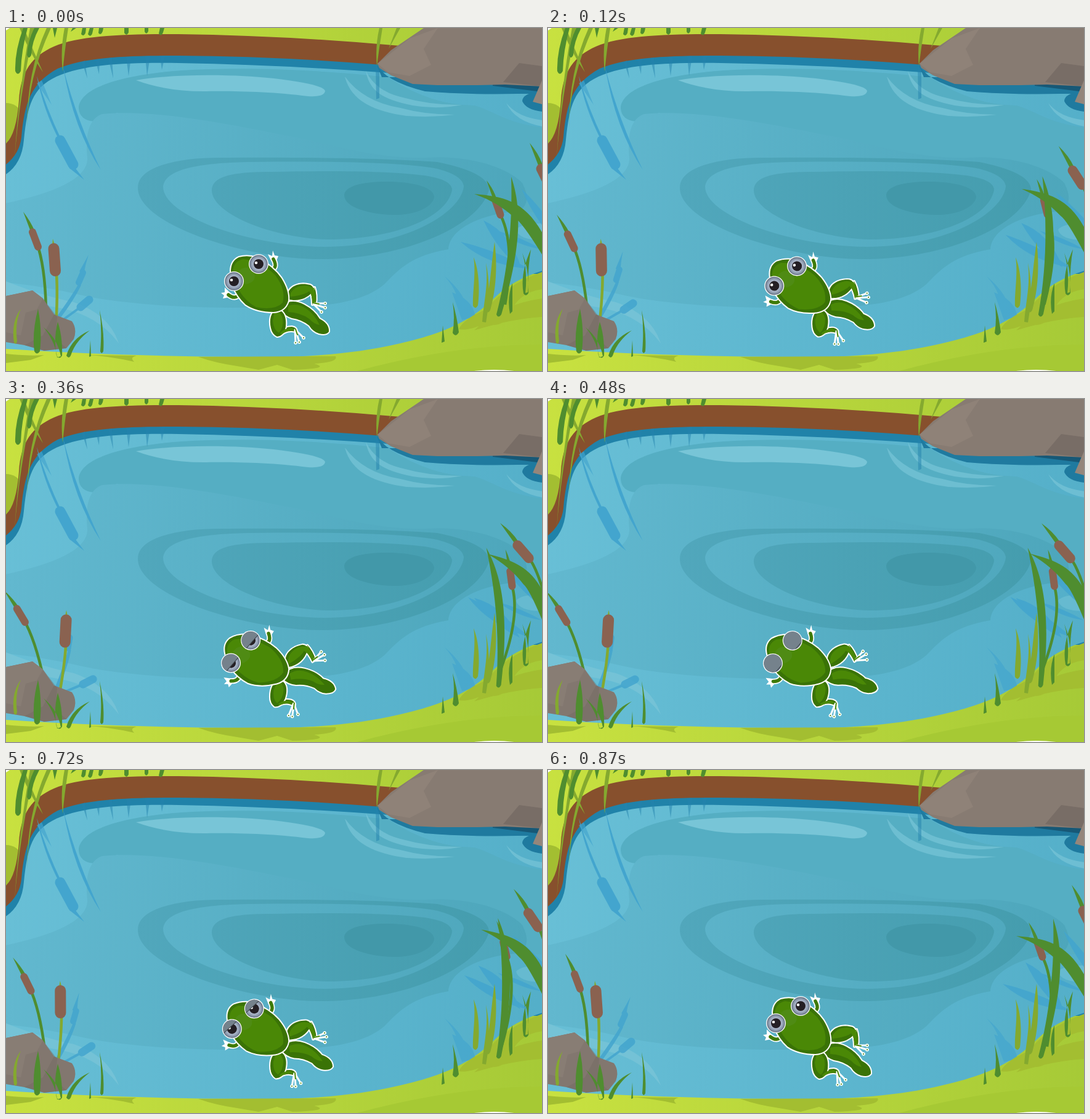
Write an HTML page that moves like this. It is 870x558 px and loops after 0.9 s.

```html
<!DOCTYPE html>
<html lang="en">
<head>
<meta charset="utf-8">
<title>Frog in a pond</title>
<style>
  html, body { margin: 0; width: 100%; height: 100%; overflow: hidden; }
  svg { display: block; width: 870px; height: 558px; }
  .leaf { fill: #4f8d2f; }
  .lime { fill: #84a92f; }
  .stem { fill: none; stroke: #4f8d2f; stroke-width: 4.5; }
  .pale { stroke: #84a92f; }
  .head { stroke: #8a6250; stroke-linecap: round; }
  .mirror { fill: #43a5ce; }
  .mirror-line { fill: none; stroke: #43a5ce; stroke-linecap: round; }
  .shade { fill: #a3be31; }
  .glint { fill: #78c5d7; }
  .skin { fill: #3a7306; stroke: #fff; stroke-width: 4; stroke-linejoin: round; paint-order: stroke; }
  .light { fill: #4a8806; }
  .arm { fill: none; stroke-linecap: round; }
  .toes { fill: none; stroke: #fff; stroke-width: 3; stroke-linecap: round; }
  .tips { fill: none; stroke: #fff; stroke-width: 5.5; stroke-linecap: round; }
  .dots { fill: none; stroke: #4b8907; stroke-width: 2; stroke-linecap: round; }
</style>
</head>
<body>
<svg viewBox="0 0 870 558">
  <defs>
    <linearGradient id="grass"><stop stop-color="#c8e140"/><stop offset="1" stop-color="#a6ca37"/></linearGradient>
    <linearGradient id="water" gradientUnits="userSpaceOnUse" x1="0" y1="200" x2="870" y2="330">
      <stop stop-color="#68bfd6"/><stop offset="1" stop-color="#54afc9"/>
    </linearGradient>
    <linearGradient id="mid" gradientUnits="userSpaceOnUse" x1="0" y1="250" x2="850" y2="350">
      <stop stop-color="#62b8cf"/><stop offset="1" stop-color="#4da6bb"/>
    </linearGradient>
    <linearGradient id="deep" gradientUnits="userSpaceOnUse" x1="214" y1="0" x2="785" y2="0">
      <stop stop-color="#51a7bc"/><stop offset="1" stop-color="#459dae"/>
    </linearGradient>
    <radialGradient id="ball"><stop offset=".5" stop-color="#b4bfd2"/><stop offset=".8" stop-color="#8f9cb0"/><stop offset="1" stop-color="#616d7e"/></radialGradient>
    <clipPath id="socket"><circle r="14.5"/></clipPath>
    <g id="eye">
      <circle r="16" fill="#fff"/>
      <circle r="14.7" fill="url(#ball)"/>
      <circle r="8" fill="#241f24"/>
      <circle cx="-4" cy="-2" r="2.3" fill="#fff"/>
      <g clip-path="url(#socket)">
        <rect id="lid" x="-20" y="-36" width="40" height="20" fill="#75828c" stroke="#3d454b" transform="rotate(-35)"/>
      </g>
    </g>
  </defs>

  <!-- banks and water -->
  <rect width="870" height="558" fill="url(#grass)"/>
  <path class="shade" d="M0 122Q18 122 27 140V200L0 188Z"/>
  <path fill="#87502d" d="M0 188Q17 172 21 118C24 70 42 46 78 30C120 12 190 10 280 10Q450 12 640 29V75H300L60 110L30 190L0 230Z"/>
  <path fill="#2082a9" d="M0 222Q22 204 25 178C30 122 40 90 84 66C130 47 200 45 280 45Q440 46 610 60L870 95V400H0Z"/>
  <path fill="url(#water)" d="M0 238Q26 220 29 182C35 126 42 98 82 79C130 58 200 56 280 57Q450 60 620 73L700 104L870 106V395Q822 410 794 438C750 481 704 498 640 513C560 532 470 537 380 535Q180 534 0 522Z"/>
  <path fill="#55aec3" d="M118 130C120 96 190 76 285 69C380 63 500 67 620 80Q690 126 760 126C790 134 810 154 870 162V300H760L180 138Q164 148 143 152Q119 150 118 130Z"/>
  <path fill="url(#mid)" d="M0 285C60 272 133 250 132 212C130 190 128 150 156 140C235 132 350 154 440 172C530 188 590 212 680 211C755 206 815 228 838 252Q855 285 832 298C775 302 720 325 718 360C660 370 640 390 615 416C570 456 480 455 390 455C270 456 170 446 120 434Q60 420 0 414Z"/>
  <path fill="url(#deep)" d="M214 260C214 225 280 211 345 211C460 210 610 211 700 218Q784 235 784 263C770 320 650 376 510 376C390 376 214 320 214 260Z"/>
  <path fill="url(#mid)" d="M255 258C258 228 320 219 400 218C510 217 640 217 700 229Q742 240 743 258C738 300 650 356 515 356C390 354 255 305 255 258Z"/>
  <path fill="url(#deep)" d="M334 264C334 240 372 234 430 234C520 232 620 232 680 240Q725 247 724 264C715 310 625 345 520 344C430 341 334 302 334 264Z"/>
  <path fill="#4298a9" d="M549 271C552 254 590 249 625 250C665 251 696 260 695 276C690 294 660 305 628 304C590 303 548 292 549 271Z"/>
  <g class="glint">
    <path d="M211 85C280 73 380 76 435 82Q518 92 518 103Q515 113 490 111C430 103 360 102 320 103Q260 103 211 85Z"/>
    <path opacity=".7" d="M550 79Q580 120 640 130Q680 141 728 141Q690 146 650 143C600 136 560 120 550 79ZM584 70Q600 102 640 112Q690 126 740 125Q700 133 660 126C610 116 590 102 584 70ZM812 122Q830 145 870 150V160Q826 152 812 122Z"/>
    <path opacity=".8" d="M0 412Q60 436 110 446Q168 466 183 513Q150 468 90 456L0 440Z"/>
    <path opacity=".5" d="M828 328Q835 318 870 318V345Q832 345 828 328Z"/>
  </g>

  <!-- still reflections -->
  <g class="mirror">
    <path d="M50 78Q65 130 90 182L87 184Q60 132 50 78ZM108 222L127 247L103 228ZM93 65Q115 150 154 231Q110 165 93 65Z"/>
    <path opacity=".65" d="M58 85L74 125L50 90ZM712 404Q746 432 752 466L738 470Q738 432 712 404ZM724 430Q758 442 762 470L740 475Z"/>
    <path fill="#2484ae" d="M128 53L132 82L123 55ZM152 50L151 75L145 52ZM172 48L174 82L166 49ZM203 47L199 78L195 47ZM234 46L229 78L226 46ZM258 46L253 68L250 46ZM600 62L601 116L606 114V65Z" opacity=".5"/>
  </g>
  <path class="mirror-line" stroke-width="17" d="M88 183L109 222"/>

  <!-- upper rocks -->
  <path fill="#1f7a9f" d="M600 56Q612 86 680 103Q760 110 870 106V80H610ZM870 102Q838 106 838 119Q844 133 870 136Z"/>
  <path fill="#175876" d="M790 88H870V104Q830 99 790 94Z"/>
  <path fill="#877b72" d="M603 58L625 36L678 0H870V95L810 92L766 93L700 93L660 91L625 77L606 65Z"/>
  <path fill="#8f8278" d="M603 58L655 17L701 0L678 34L690 60L655 78L620 72Z"/>
  <path fill="#786d66" d="M807 88L833 57L870 62V95Z"/>
  <path fill="#94867b" d="M855 120L870 85V124Z"/>

  <!-- upper reeds -->
  <g class="lime">
    <path d="M39 0Q21 100 14 212Q21 115 46 0ZM66 0Q34 70 34 162Q35 82 73 0ZM95 0Q88 36 92 71Q95 38 101 0ZM22 0Q38 40 60 72Q44 36 29 0ZM606 0Q599 30 602 62Q606 30 611 0ZM634 0L621 34L640 0Z"/>
  </g>
  <g class="leaf">
    <path d="M28 0Q14 38 15 70Q19 79 24 70Q25 36 35 0ZM46 0Q35 22 34 44Q37 52 41 44Q42 22 54 0ZM76 0L79 16L83 0ZM124 0L122 10Q126 15 129 8L130 0ZM136 0L133 10Q137 16 140 9L142 0ZM151 0L150 8Q154 13 157 5L158 0ZM192 0V8Q196 14 199 7V0ZM225 0V6Q228 12 231 5V0ZM250 0L248 9Q252 15 255 7L257 0ZM108 0L105 6L114 0Z"/>
  </g>

  <!-- grass shadows -->
  <path class="shade" d="M870 397Q812 417 780 457Q742 474 735 490Q750 493 780 480Q800 490 815 470Q830 430 870 425ZM870 440Q800 450 760 492Q820 473 870 470ZM312 535L535 534Q540 544 500 546Q530 554 465 556L440 548L410 556L375 550Q340 545 312 535ZM128 532L212 533Q200 536 208 543Q165 533 128 532ZM0 530Q40 534 62 532L40 540L0 545Z"/>
  <path fill="#a6c934" d="M870 515Q730 515 570 558H870Z"/>
  <path fill="#fff" d="M760 558Q792 554 825 558ZM0 0H6L0 4Z"/>

  <!-- left reeds -->
  <g class="mirror" opacity=".85" data-swing="-15 75 478">
    <path d="M134 369Q128 388 127 398L119 396ZM118 416Q106 437 82 470L88 472Q112 440 122 418Z"/>
    <path class="mirror-line" stroke-width="10" d="M125 398L118 414"/>
  </g>
  <g opacity=".85" data-swing="14 80 475">
    <path class="mirror-line" stroke-width="13" d="M135 442L121 454"/>
    <path class="mirror-line" stroke-width="4" d="M121 454L88 478"/>
  </g>
  <g data-swing="-10.9 80 474">
    <path class="stem" d="M53 359Q65 400 65 472"/>
    <path class="leaf" d="M28 299Q40 315 46 329L40 331Z"/>
    <path class="head" stroke-width="12" d="M43 332L52 356"/>
  </g>
  <g data-swing="7.2 83 525">
    <path class="stem pale" d="M82 400Q84 435 81 485"/>
    <path class="lime" d="M75 352L76 343L79 352Z"/>
    <path class="head" stroke-width="18" d="M77.5 359L80 395"/>
  </g>
  <path fill="#82776f" d="M0 436L43 427L60 440L78 466L107 477Q116 490 110 506L98 521L62 525L30 516L0 511Z"/>
  <path fill="#887d74" d="M0 436L43 427L60 440L50 458L32 463L24 500L0 495Z"/>
  <path fill="#71665f" d="M60 440L78 466L60 500L30 516L62 525L98 521L80 505L83 470Z" opacity=".4"/>
  <path class="lime" d="M24 457Q8 478 13 512Q17 516 18 509Q14 480 24 457Z"/>
  <path class="leaf" d="M52 457Q42 495 46 526Q50 533 55 526Q59 492 52 457ZM61 487Q84 506 89 534L83 536Q80 510 61 487ZM84 478Q77 505 82 533Q87 540 91 533Q92 503 84 478ZM136 492Q106 505 98 533Q102 539 105 533Q112 510 136 492ZM152 459Q160 495 158 526Q155 532 153 526Q156 490 152 459ZM137 508L138 534L135 535Z"/>

  <!-- right reeds -->
  <g class="mirror" opacity=".85">
    <path data-swing="12 870 395" d="M738 348Q792 360 850 392Q780 386 738 348Z"/>
    <path data-swing="-11 825 400" d="M775 313Q820 334 836 390Q800 366 775 313Z"/>
    <path data-swing="-13 885 395" d="M837 262Q862 285 890 325L885 340Q852 300 837 262Z"/>
    <path d="M798 330Q835 340 870 360Q830 354 798 330Z"/>
  </g>
  <g data-swing="-14.8 885 386">
    <path class="stem" d="M883 258Q894 290 890 386"/>
    <path class="leaf" d="M850 187Q865 205 871 223L865 226Z"/>
    <path class="head" stroke-width="16" d="M868.5 229L881 254"/>
  </g>
  <g data-swing="12 810 398">
    <path class="stem" d="M804 307C817 335 822 380 810 450"/>
    <path class="leaf" d="M780 248Q791 262 796 277L791 279Z"/>
    <path class="head" stroke-width="12" d="M794.5 281L802.5 304"/>
  </g>
  <path class="leaf" data-swing="10 878 388" d="M760 270C810 274 848 281 880 352L886 395Q840 317 826 309C805 290 785 279 760 270Z"/>
  <path class="leaf" data-swing="-10.6 800 468" d="M820 242C840 300 833 370 804 466Q799 473 796 466C817 385 822 310 820 242Z"/>
  <path class="lime" d="M759 373C763 400 757 430 758 452Q762 459 766 451C769 425 768 395 759 373ZM793 348C787 390 786 420 778 459Q782 466 786 459C797 420 797 380 793 348ZM779 382C783 420 776 440 773 478L779 479C786 440 785 410 779 382Z"/>
  <path class="leaf" d="M852 360Q834 400 840 432Q844 438 848 431Q846 395 852 360ZM838 366Q850 394 847 430L843 431Q847 396 838 366ZM725 446Q732 470 735 495Q730 504 725 496Q729 472 725 446ZM709 484L712 510L707 512ZM822 415Q813 438 818 465L822 461Z"/>

  <!-- frog -->
  <g data-swing="-14.5 439 441">
    <path class="skin" d="M450 450Q465 440 484 450Q501 459 509 473Q525 481 524 494Q520 500 508 497Q498 494 492 484Q479 474 464 472Q452 468 446 458Z"/>
    <path class="light" d="M458 452Q473 446 488 457Q501 466 509 483Q500 482 492 473Q478 463 458 462Z"/>

    <g data-swing="-11.4 457 436">
      <path class="skin" d="M492 424Q497 434 497 450L503 449Q505 434 501 422Z"/>
      <path class="skin" d="M457 437C457 420 476 413 494 418Q502 422 497 430C488 440 474 446 457 441Z"/>
      <path class="light" d="M461 434Q466 420 485 419Q499 420 494 427Q484 435 461 437Z"/>
      <path class="light" d="M492 421L500 423Q503 434 502 448L498 449Q497 434 492 428Z"/>
      <g data-swing="-23 500 448">
        <path class="toes" d="M499 448L518 448M499 449L518 455M499 449L512 462"/>
        <path class="tips" d="M518 448h.1M518 455h.1M512 462h.1"/>
        <path class="dots" d="M498 447L508 449M518 448h.1M518 455h.1M512 462h.1"/>
      </g>
    </g>
    <g data-swing="27 440 460">
      <path class="skin" d="M444 501Q454 492 464 493L472 494Q472 487 464 486Q453 486 443 494Z"/>
      <path class="skin" d="M438 459C450 457 456 470 454 486Q451 501 440 502Q432 498 430 488C427 474 430 463 438 459Z"/>
      <path class="light" d="M436 462Q445 460 449 472Q451 488 443 496Q434 491 433 476Z"/>
      <path class="light" d="M445 496Q454 487 464 488L470 492Q458 490 447 499Z"/>
      <g data-swing="13 470 491">
        <path class="toes" d="M469 491L470 512M470 491L476 511M470 491L483 504"/>
        <path class="tips" d="M470 512h.1M476 511h.1M483 504h.1"/>
        <path class="dots" d="M470 490L473 499M470 512h.1M476 511h.1M483 504h.1"/>
      </g>
    </g>
    <g data-swing="24 428 395">
      <path fill="#fff" d="M430 378L425 368L432 371L433 362L436 370L442 371L438 381Z"/>
      <path class="arm" stroke="#fff" stroke-width="9" d="M426 395Q443 392 434 376"/>
      <path class="arm" stroke="#3f7b07" stroke-width="5.5" d="M426 395Q443 392 434 376"/>
    </g>
    <g data-swing="-24 378 432">
      <path fill="#fff" d="M364 431L355 422L355 430L349 431L354 435L352 440L362 438Z"/>
      <path class="arm" stroke="#fff" stroke-width="9" d="M380 432Q372 443 361 434"/>
      <path class="arm" stroke="#3f7b07" stroke-width="5.5" d="M380 432Q372 443 361 434"/>
    </g>

    <path class="skin" d="M365 396Q365 379 378 373Q392 369 408 374Q434 388 447 407Q460 428 458 444Q453 461 434 462Q407 462 389 450Q375 437 369 421Z"/>
    <path class="light" d="M368 397Q369 379 385 376Q414 379 437 402Q455 426 449 447Q436 460 406 454Q376 438 368 397Z"/>
    <path fill="#548f22" opacity=".5" d="M377 396Q390 383 402 397Q409 413 389 417Z"/>
    <use href="#eye" x="410" y="384"/>
    <use href="#eye" x="370" y="412"/>
  </g>
</svg>
<script>
  const LOOP = 900, STEP = 30;
  const lid = document.getElementById('lid');
  const swings = [...document.querySelectorAll('[data-swing]')].map(el => {
    const [angle, x, y] = el.dataset.swing.split(' ').map(Number);
    return { el, angle, x, y };
  });

  function draw(now) {
    const t = Math.floor(now % LOOP / STEP) * STEP;
    const sway = Math.sin(Math.PI * t / (LOOP - STEP));
    for (const { el, angle, x, y } of swings) {
      el.setAttribute('transform', `rotate(${angle * sway} ${x} ${y})`);
    }
    const closed = Math.max(0, Math.min(t - 120, LOOP - STEP - t) / 400);
    lid.setAttribute('height', 20 + 32 * closed);
  }

  const start = performance.now();
  requestAnimationFrame(function tick(now) {
    draw(Math.max(0, now - start));
    requestAnimationFrame(tick);
  });
</script>
</body>
</html>
```
